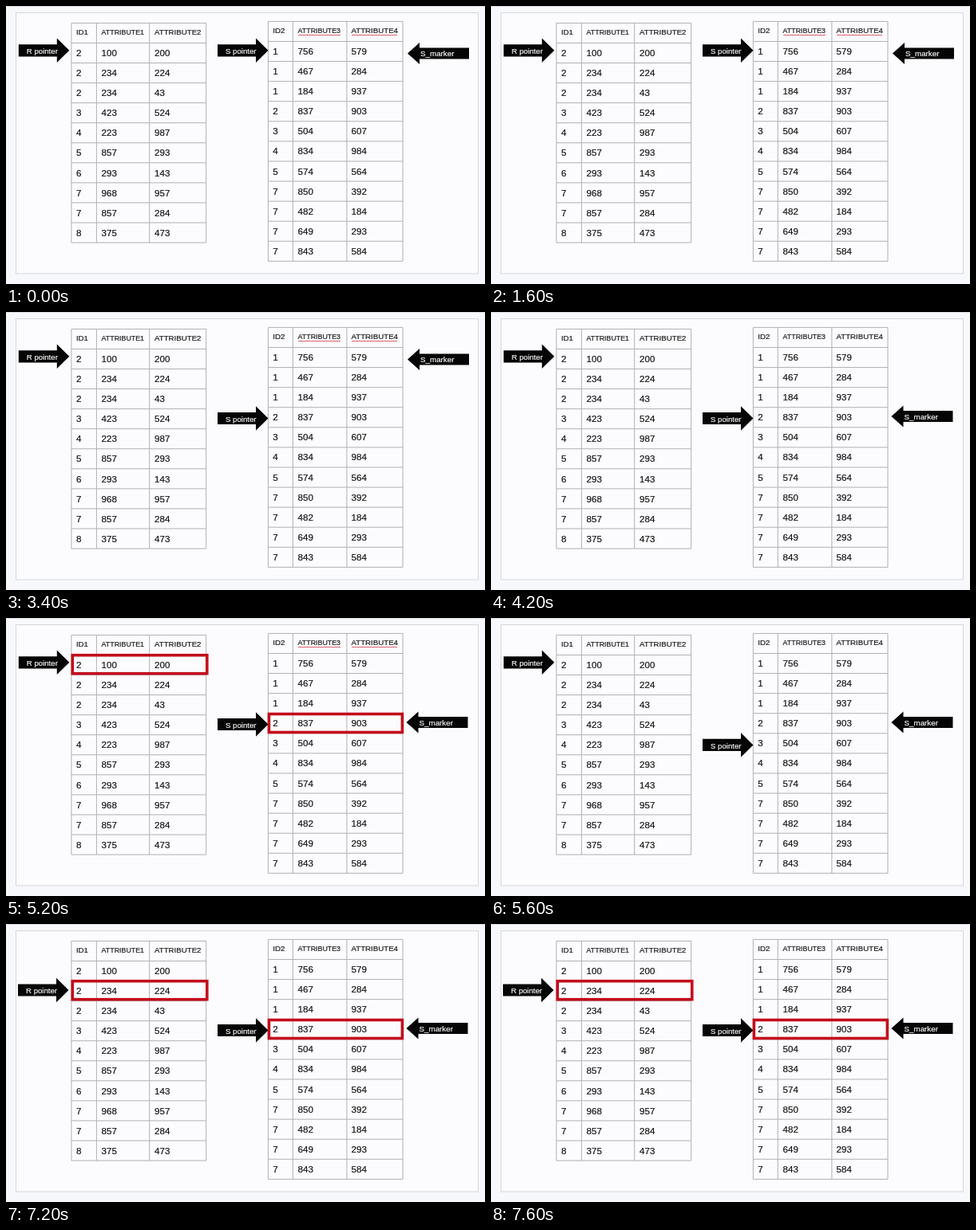
Animation, 600 px wide and 349 px high, one loop 8 s. Source, as an HTML page with a canvas:

```html
<!DOCTYPE html>
<html lang="en">
<head>
<meta charset="utf-8">
<title>Sort-merge join</title>
<style>
  html, body { margin: 0; width: 100%; height: 100%; overflow: hidden; background: #f6f8fc; }
  canvas { display: block; width: 600px; height: 349px; }
</style>
</head>
<body>
<canvas id="stage" width="600" height="349"></canvas>
<script>
const ctx = document.getElementById('stage').getContext('2d');
const LOOP = 8000;
const RED = '#c30d1b';

const tableR = {
  cols: [81.9, 113.4, 179.7, 250.7], top: 21.4, pitch: 25.06, textX: [87.9, 119.6, 186],
  head: ['ID1', 'ATTRIBUTE1', 'ATTRIBUTE2'],
  rows: ['2 100 200', '2 234 224', '2 234 43', '3 423 524', '4 223 987',
         '5 857 293', '6 293 143', '7 968 957', '7 857 284', '8 375 473']
};
const tableS = {
  cols: [328.4, 359.3, 426.9, 497], top: 19.4, pitch: 25.08, textX: [334.2, 365.6, 432.5],
  head: ['ID2', 'ATTRIBUTE3', 'ATTRIBUTE4'],
  rows: ['1 756 579', '1 467 284', '1 184 937', '2 837 903', '3 504 607', '4 834 984',
         '5 574 564', '7 850 392', '7 482 184', '7 649 293', '7 843 584']
};

// Each step holds until the next one: rows of the pointers, spelling underline, match boxes.
const steps = [
  { at: 0,    r: 0, s: 0, mark: 0, underline: true },
  { at: 1800, r: 0, s: 1, mark: 0 },
  { at: 2600, r: 0, s: 2, mark: 0 },
  { at: 3400, r: 0, s: 3, mark: 0, underline: true },
  { at: 4200, r: 0, s: 3, mark: 3 },
  { at: 4800, r: 0, s: 3, mark: 3, underline: true, match: true },
  { at: 5600, r: 0, s: 4, mark: 3 },
  { at: 6400, r: 1, s: 3, mark: 3 },
  { at: 7200, r: 1, s: 3, mark: 3, match: true }
];

// A hairline stroke gives the type its slightly heavy weight.
function text(str, x, y, size, color) {
  ctx.font = `${size}px "Liberation Sans", Arial, sans-serif`;
  ctx.fillStyle = ctx.strokeStyle = color;
  ctx.lineWidth = 0.2;
  ctx.fillText(str, x, y);
  ctx.strokeText(str, x, y);
}

function line(x1, y1, x2, y2) {
  ctx.beginPath();
  ctx.moveTo(x1, y1);
  ctx.lineTo(x2, y2);
  ctx.stroke();
}

function drawTable({ cols, top, pitch, textX, head, rows }) {
  const bottom = top + pitch * (rows.length + 1);
  ctx.strokeStyle = '#b0b0b4';
  ctx.lineWidth = 1;
  for (const x of cols) line(x, top, x, bottom);
  for (let i = 0; i <= rows.length + 1; i++) {
    const y = top + i * pitch;
    line(cols[0], y, cols[3], y);
  }
  head.forEach((label, i) => text(label, textX[i], top + 14.8, i === 1 ? 8.85 : 9.7, '#1c1c1c'));
  rows.forEach((row, j) => row.split(' ').forEach((value, i) =>
    text(value, textX[i], top + 41.2 + j * 25.17, 11.6, '#161616')));
}

function arrow(tip, tail, y, neck, half, body) {
  ctx.fillStyle = '#050505';
  ctx.beginPath();
  ctx.moveTo(tip, y);
  ctx.lineTo(neck, y - half);
  ctx.lineTo(neck, y - body);
  ctx.lineTo(tail, y - body);
  ctx.lineTo(tail, y + body);
  ctx.lineTo(neck, y + body);
  ctx.lineTo(neck, y + half);
  ctx.fill();
}

function pointer(label, x, y) {
  arrow(x + 63.5, x, y, x + 48, 15.3, 7.6);
  text(label, x + 10, y + 4.2, 9.65, '#f4f4f4');
}

function marker(row) {
  const x = row ? 501.5 : 503;
  const y = row ? 131.1 : 59.5;
  arrow(x, x + 77, y, x + 15, 13.5, 7);
  text('S_marker', x + 16, y + 3.8, 9.8, '#f4f4f4');
}

function matchBox(x, y, w) {
  ctx.strokeStyle = RED;
  ctx.lineWidth = 3.6;
  ctx.strokeRect(x, y, w, 23);
}

function draw(time) {
  const { r, s, mark, underline, match } = steps.findLast(step => step.at <= time);
  ctx.fillStyle = '#f6f8fc';
  ctx.fillRect(0, 0, 600, 349);
  ctx.fillStyle = '#dcdde1';
  ctx.fillRect(0, 0, 600, 1);
  ctx.fillStyle = '#fcfbfe';
  ctx.fillRect(12.5, 8.5, 579, 327.5);
  ctx.strokeStyle = '#d6d7db';
  ctx.lineWidth = 1;
  ctx.strokeRect(12.5, 8.5, 579, 327.5);

  drawTable(tableR);
  drawTable(tableS);
  if (underline) {
    ctx.strokeStyle = '#d8606c';
    ctx.lineWidth = 1;
    line(366, 36.5, 419, 36.5);
    line(433, 36.5, 490, 36.5);
  }
  if (match) {
    matchBox(83.3, 46.7 + r * 25, 168.5);
    matchBox(329.4, 120.5, 167);
  }
  pointer('R pointer', r ? 15 : 15.8, 55.8 + r * 27.2);
  pointer('S pointer', 265, 55.8 + s * 25.9);
  marker(mark);
}

function frame() {
  draw(performance.now() % LOOP);
  requestAnimationFrame(frame);
}
frame();
</script>
</body>
</html>
```
